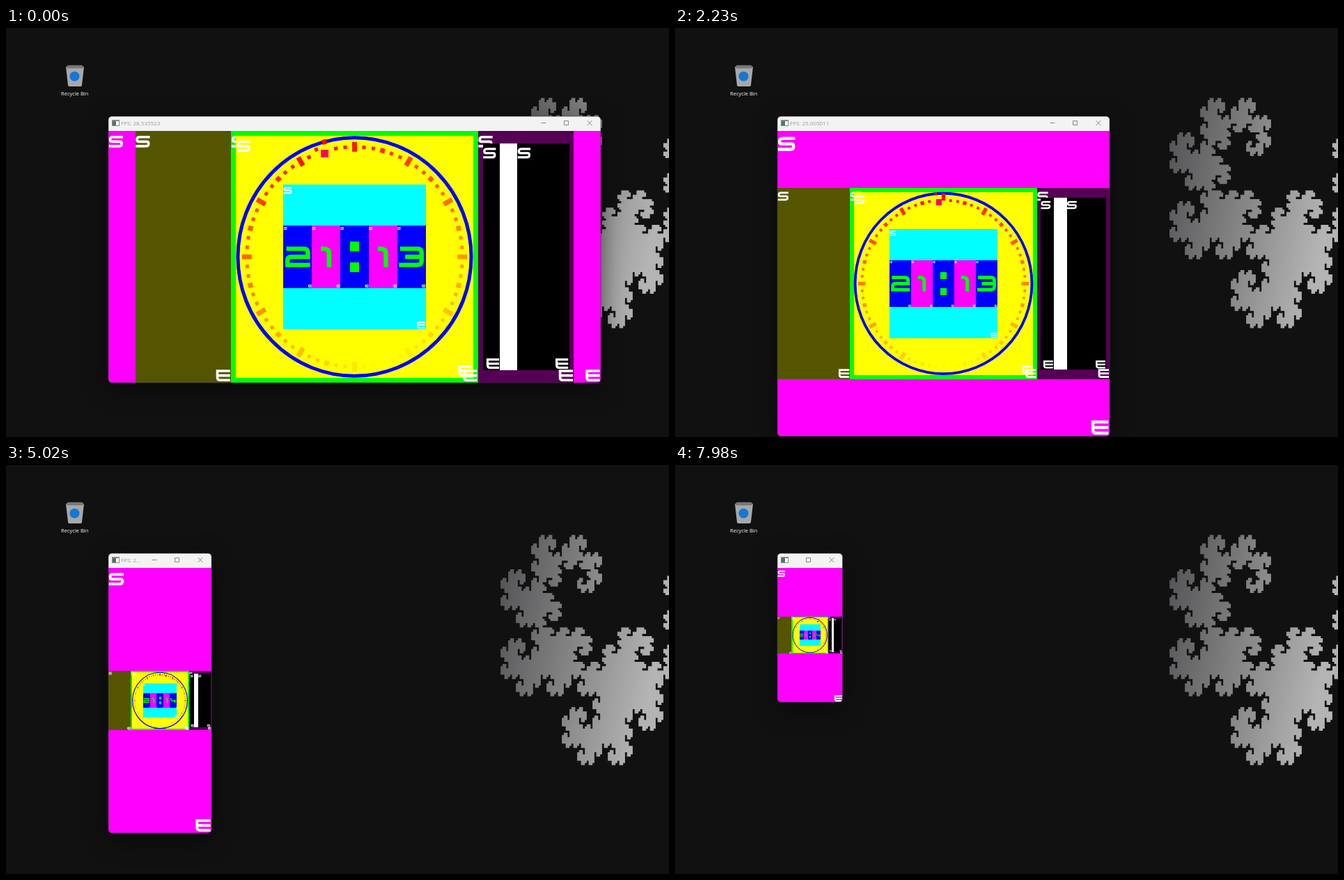
An HTML page with a canvas for the animation above (8000 ms loop, 952 by 588 pixels).

```html
<!DOCTYPE html>
<html lang="en">
<head>
<meta charset="utf-8">
<title>Resizable clock layout</title>
<style>
  html, body { margin: 0; width: 100%; height: 100%; overflow: hidden; background: #111; }
  canvas { display: block; }
</style>
</head>
<body>
<canvas id="stage" width="952" height="588"></canvas>
<script>
const stage = document.getElementById('stage');
const ctx = stage.getContext('2d');
const LOOP = 8000, REDRAW = 93.25, LEAD = 17;
const LEFT = 147, TOP = 127, BAR = 21, MIN_RIGHT = 240.5, ASPECT = 1.74;

// The dragged corner: [time, right, bottom]
const drag = [
  [0, 854, 510], [840, 788, 550], [1010, 763, 556], [2230, 623, 587], [3900, 410, 573],
  [5020, 295, 529], [5820, 240, 487], [6885, 240, 411], [7910, 240, 341]
];

// Smooth curve through the drag points
function corner(t, col) {
  const last = drag.length - 1;
  let i = 0;
  while (i < last - 1 && drag[i + 1][0] <= t) i++;
  const slope = j => {
    const a = drag[Math.max(0, j - 1)], b = drag[Math.min(last, j + 1)];
    return (b[col] - a[col]) / (b[0] - a[0]);
  };
  const a = drag[i], b = drag[i + 1], span = b[0] - a[0];
  const k = Math.min(1, (t - a[0]) / span), q = 1 - k;
  return a[col] + (b[col] - a[col]) * k * k * (3 - 2 * k)
    + span * k * q * (q * slope(i) - k * slope(i + 1));
}

// Stroked letters in a 24 x 20 box
const glyphs = {
  S: 'M24 2.2H7Q2.2 2.2 2.2 6V7Q2.2 10 5 10H19Q21.8 10 21.8 13V14Q21.8 17.8 17 17.8H0',
  E: 'M24 2.2H2.2V13Q2.2 17.8 7 17.8H24M2.2 10H24',
  2: 'M1 2.2H18Q21.8 2.2 21.8 6V10H6Q2.2 10 2.2 13V17.8H24',
  1: 'M7 2.2H10Q14.8 2.2 14.8 7V20',
  3: 'M1 2.2H18Q21.8 2.2 21.8 6V14Q21.8 17.8 17 17.8H0M6 10H21.8',
  4: 'M2.6 0V8Q2.6 12 7 12H24M18 6V20'
};
for (const k in glyphs) glyphs[k] = new Path2D(glyphs[k]);

function glyph(name, x, y, w, color) {
  ctx.save();
  ctx.translate(x, y);
  ctx.scale(w / 24, w / 24);
  ctx.strokeStyle = color;
  ctx.lineWidth = 4.3;
  ctx.stroke(glyphs[name]);
  ctx.restore();
}

function fillRect(r, color) {
  const x = Math.round(r.x), y = Math.round(r.y);
  ctx.fillStyle = color;
  ctx.fillRect(x, y, Math.round(r.x + r.w) - x, Math.round(r.y + r.h) - y);
}

const part = (r, x, y, w, h) => ({ x: r.x + r.w * x, y: r.y + r.h * y, w: r.w * w, h: r.h * h });
const inset = (r, k) => part(r, k, k, 1 - 2 * k, 1 - 2 * k);

// A filled box marked S at its start and E at its end
function box(r, color, content) {
  const w = r.h * .056;
  fillRect(r, color);
  glyph('S', r.x + r.h * .002, r.y + r.h * .019, w, '#fff');
  if (content) content(r);
  glyph('E', r.x + r.w - w - r.h * .004, r.y + r.h * .948, w, '#fff');
}

function dial(r, t) {
  const cx = r.x + r.w / 2, cy = r.y + r.h / 2, rx = r.w / 2, ry = r.h / 2;
  const line = Math.max(1, r.h * .0145);
  const hand = -16.6 + t * .006;
  const at = (deg, radius) => {
    const a = deg * Math.PI / 180;
    return [cx + Math.sin(a) * rx * radius, cy - Math.cos(a) * ry * radius];
  };
  ctx.strokeStyle = '#00f';
  ctx.lineWidth = line;
  ctx.beginPath();
  ctx.ellipse(cx, cy, rx - line / 2, ry - line / 2, 0, 0, 7);
  ctx.stroke();
  // Ticks near the hand are redder and pushed outwards
  for (let i = 0; i < 72; i++) {
    const deg = i * 5;
    const gap = Math.abs((deg - hand + 540) % 360 - 180);
    const w = ry * (i % 3 ? .029 : .04), h = i % 6 ? w : w * 2;
    ctx.save();
    ctx.translate(...at(deg, .91 + Math.max(0, .11 - .022 * gap)));
    ctx.rotate(deg * Math.PI / 180);
    ctx.fillStyle = `hsl(${gap / 3},100%,50%)`;
    ctx.fillRect(-w / 2, -h / 2, w, h);
    ctx.restore();
  }
  const [x, y] = at(hand, .89), s = ry * .064;
  fillRect({ x: x - s / 2, y: y - s / 2, w: s, h: s }, 'hsl(340,100%,50%)');
}

function digits(r, t) {
  [...(t < 2770 ? '21:13' : '21:14')].forEach((ch, i) => {
    box(part(r, i / 5, 0, .2, 1), i % 2 ? '#f0f' : '#00f', c => {
      const cx = c.x + c.w / 2, cy = c.y + c.h / 2, w = c.h * .4;
      if (ch !== ':') return glyph(ch, cx - w / 2, cy - w * 5 / 12, w, '#0f0');
      for (const dy of [-.245, .09])
        fillRect({ x: cx - c.h * .07, y: cy + dy * c.h, w: c.h * .14, h: c.h * .155 }, '#0f0');
    });
  });
}

function layout(client, t) {
  box(client, '#f0f', () => {
    const w = Math.min(client.w, client.h * ASPECT), h = w / ASPECT;
    const p = { x: client.x + (client.w - w) / 2, y: client.y + (client.h - h) / 2, w, h };
    box(part(p, 0, 0, 7 / 32, 1), '#550');
    box(part(p, 7 / 32, 0, 9 / 16, 1), '#0f0', g => box(inset(g, .02), '#ff0', y => {
      dial(y, t);
      box(inset(y, .2), '#0ff', c => digits(part(c, 0, 2 / 7, 1, 3 / 7), t));
    }));
    box(part(p, 25 / 32, 0, 7 / 32, 1), '#505', v => {
      const b = inset(v, .05);
      box(part(b, 0, 0, .2, 1), '#000');
      box(part(b, .4, 0, .6, 1), '#000');
      fillRect(part(b, .2, 0, .2, 1), '#fff');
    });
  });
}

function titleBar(right, text) {
  fillRect({ x: LEFT, y: TOP, w: right - LEFT, h: BAR }, '#f3f3f3');
  fillRect({ x: 152, y: 132, w: 11, h: 9 }, '#8a8a8a');
  fillRect({ x: 153, y: 134, w: 9, h: 6 }, '#fff');
  fillRect({ x: 153, y: 134, w: 5, h: 6 }, '#47776f');

  ctx.font = '8px "Open Sans", sans-serif';
  ctx.textAlign = 'left';
  ctx.fillStyle = '#999';
  const room = right - 101 - 165;
  if (ctx.measureText(text).width > room) {
    while (text && ctx.measureText(text + '...').width > room) text = text.slice(0, -1);
    if (text) text += '...';
  }
  ctx.fillText(text, 165, 139.5);

  const x = Math.round(right) - 16, y = 136.5;
  ctx.strokeStyle = '#888';
  ctx.lineWidth = 1;
  ctx.beginPath();
  ctx.moveTo(x - 3.5, y - 3.5); ctx.lineTo(x + 3.5, y + 3.5);
  ctx.moveTo(x + 3.5, y - 3.5); ctx.lineTo(x - 3.5, y + 3.5);
  ctx.rect(x - 36.5, y - 3, 6, 6);
  if (room > 0) { ctx.moveTo(x - 69.5, y); ctx.lineTo(x - 62.5, y); }
  ctx.stroke();
}

// Heighway dragon from (0,0) to (1,0), drawn as one folded line
function dragon(order) {
  const path = new Path2D(), step = 2 ** (-order / 2);
  let x = 0, y = 0, angle = order * Math.PI / 4;
  path.moveTo(x, y);
  for (let n = 1; n <= 2 ** order; n++) {
    x += Math.cos(angle) * step;
    y += Math.sin(angle) * step;
    path.lineTo(x, y);
    // The bit above the lowest set bit gives the turn
    angle += n & ((n & -n) << 1) ? Math.PI / 2 : -Math.PI / 2;
  }
  return { path, step };
}

function paintDesktop() {
  const canvas = document.createElement('canvas');
  canvas.width = stage.width;
  canvas.height = stage.height;
  const c = canvas.getContext('2d');
  c.fillStyle = '#111';
  c.fillRect(0, 0, 952, 588);

  const { path, step } = dragon(14);
  c.save();
  c.translate(827, 167);
  c.scale(352, 396);
  const greys = c.createLinearGradient(-.34, .05, .32, .2);
  greys.addColorStop(0, '#565659');
  greys.addColorStop(.5, '#858585');
  greys.addColorStop(1, '#b4b4b4');
  c.strokeStyle = greys;
  c.lineWidth = step;
  c.lineCap = 'square';
  c.stroke(path);
  c.restore();

  c.fillStyle = '#a6a8aa';
  c.fill(new Path2D('M86 56L112 56L109 82Q109 84 106 84H92Q89 84 89 82Z'));
  c.fillStyle = '#77797b';
  c.fill(new Path2D('M86 56L89 53.5H109L112 56L110 58H88Z'));
  c.fillStyle = '#1677d2';
  c.beginPath();
  c.arc(98.5, 69.5, 7, 0, 7);
  c.fill();
  c.fillStyle = '#fff';
  c.font = '7.5px "Open Sans", sans-serif';
  c.textAlign = 'center';
  c.fillText('Recycle Bin', 98.7, 96.5);
  return canvas;
}
const desktop = paintDesktop();

function draw(t) {
  const index = Math.floor((t + LEAD) / REDRAW);
  const time = Math.max(0, index * REDRAW - LEAD);
  const right = Math.max(MIN_RIGHT, corner(time, 1)), bottom = corner(time, 2);
  const fps = 25.5 + 4 * Math.sin(index * 12.9898 + 2.28);

  ctx.drawImage(desktop, 0, 0);
  const frame = new Path2D();
  frame.roundRect(LEFT, TOP, right - LEFT, bottom - TOP, 5);
  ctx.save();
  ctx.shadowColor = 'rgba(0,0,0,.5)';
  ctx.shadowBlur = 34;
  ctx.shadowOffsetY = 9;
  ctx.fillStyle = '#333';
  ctx.fill(frame);
  ctx.restore();

  ctx.save();
  ctx.clip(frame);
  titleBar(right, 'FPS: ' + fps.toFixed(6));
  layout({ x: LEFT, y: TOP + BAR, w: right - LEFT, h: bottom - TOP - BAR }, time);
  ctx.restore();
  ctx.strokeStyle = 'rgba(60,60,60,.6)';
  ctx.lineWidth = 1;
  ctx.stroke(frame);
}

const start = performance.now();
function tick() {
  draw((performance.now() - start) % LOOP);
  requestAnimationFrame(tick);
}
tick();
</script>
</body>
</html>
```
